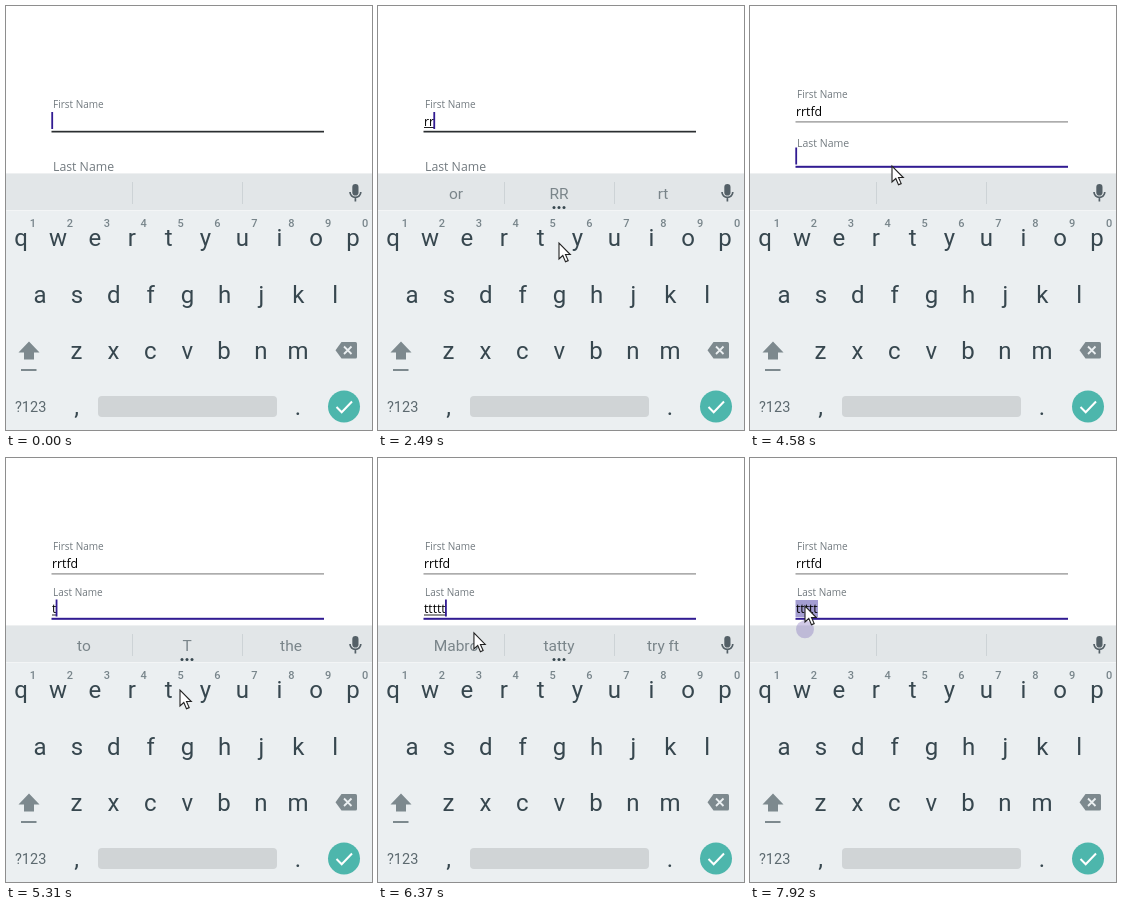
Animation, 366 px wide and 424 px high, one loop 7.99 s. Source, as an HTML page:

```html
<!DOCTYPE html>
<html lang="en">
<head>
<meta charset="utf-8">
<title>Form entry</title>
<style>
html, body { margin: 0; width: 100%; height: 100%; overflow: hidden; background: #fff; }
svg { display: block; width: 366px; height: 424px; }
text { font-family: Roboto, sans-serif; white-space: pre; }
.form text { font-family: "Open Sans", "Noto Sans", sans-serif; font-size: 12.3px; }
.form .label { fill: #737b80; font-size: 10px; }
.mid { text-anchor: middle; }
.key { font-size: 24px; fill: #37474f; }
.digit { font-size: 11px; font-weight: 500; fill: #78858b; }
.word { font-size: 15.5px; fill: #7a858a; }
</style>
</head>
<body>
<svg viewBox="0 0 366 424">
  <rect width="366" height="424" fill="#fff"/>
  <g id="form" class="form">
    <text class="label" x="47" y="101.5">First Name</text>
    <rect id="line1" x="45.5" width="272.5"/>
    <text id="label2" class="label" x="47">Last Name</text>
    <rect id="line2" x="45.5" width="272.5"/>
    <rect id="selection" x="45.5" y="151.5" width="22.5" height="17" fill="#a39dd1"/>
    <text id="value1" x="46" y="119.5"></text>
    <text id="value2" x="46" y="164.5"></text>
    <rect id="under" x="46" height="1" fill="#222"/>
    <rect id="caret" width="1.8" height="17" fill="#311b92"/>
  </g>
  <g id="board">
    <rect y="167" width="366" height="1" fill="#eef0f1"/>
    <rect y="168" width="366" height="256" fill="#ebeff1"/>
    <rect y="168" width="366" height="36" fill="#e2e6e8"/>
    <rect y="204" width="366" height="1" fill="#f3f5f6"/>
    <path d="M126.5 176V198M236.5 176V198" stroke="#cdd3d6"/>
    <g fill="#546067">
      <rect x="346.3" y="178" width="6.2" height="11.5" rx="3.1"/>
      <path d="M344 186a5.4 5.4 0 0 0 10.8 0M349.4 191.5V195.5" fill="none" stroke="#546067" stroke-width="1.7"/>
    </g>
    <path d="M23 335.5L33.5 346.5H28V353.5H18V346.5H12.500Z" fill="#7d898e"/>
    <rect x="15" y="363" width="15.500" height="2" fill="#7d898e"/>
    <path d="M335.500 336H349.500a1.500 1.500 0 0 1 1.500 1.500V351a1.500 1.500 0 0 1-1.500 1.500H335.500L329.500 344.300Z" fill="#7d898e"/>
    <path d="M338 340.500L345.500 348M345.500 340.500L338 348" stroke="#ebeff1" stroke-width="1.8"/>
    <text x="9" y="406" font-size="14.5" fill="#5c696f">?123</text>
    <rect x="92" y="390" width="179" height="21" rx="4" fill="#d0d4d6"/>
    <circle cx="338" cy="400.500" r="16" fill="#4db6ac"/>
    <path d="M330.500 401L335.700 406.200L346 395.500" fill="none" stroke="#fff" stroke-width="2"/>
  </g>
  <g id="words"></g>
  <g id="dots" fill="#37474f">
    <circle cx="176" cy="201.500" r="1.5"/><circle cx="181" cy="201.500" r="1.5"/><circle cx="186" cy="201.500" r="1.5"/>
  </g>
  <g id="popup">
    <rect x="-21" y="-91" width="45" height="103" rx="2" fill="#000" opacity=".1"/>
    <rect x="-21.500" y="-92" width="44.500" height="102.500" rx="2" fill="#000" opacity=".22"/>
    <rect x="-22" y="-93" width="44.500" height="102.500" rx="2" fill="#ced2d4"/>
    <text id="popupKey" class="mid" y="-54" font-size="34" fill="#37474f"></text>
    <path d="M9 -45H21" stroke="#7d898e" stroke-width="1.5" stroke-dasharray="1.5 2"/>
  </g>
  <path id="handle" d="M55 161.500L61.500 165A9 9 0 1 1 48.500 165Z" fill="#7a68b8"/>
  <circle id="tap" r="12" fill="#e9e53f" opacity=".8"/>
  <path id="mouse" d="M0 0V16L3.800 12.500L6.500 18.800L9.200 17.600L6.500 11.500H11.300Z" fill="#fff" stroke="#222" stroke-width="1.1"/>
</svg>
<script>
const LOOP = 7990;
const $ = id => document.getElementById(id);
const set = (el, attrs) => { for (const k in attrs) el.setAttribute(k, attrs[k]); };
const show = (el, on) => el.setAttribute('visibility', on ? 'visible' : 'hidden');
const clamp = v => Math.max(0, Math.min(1, v));
const progress = (t, from, to) => clamp((t - from) / (to - from));
const mix = (a, b, p) => a + (b - a) * p;

function addText(parent, cls, x, y, content = '') {
  const el = document.createElementNS('http://www.w3.org/2000/svg', 'text');
  set(el, { class: cls + ' mid', x, y });
  el.textContent = content;
  return $(parent).appendChild(el);
}

// Keyboard rows: letters, first key centre, baseline
const keys = {};
for (const [letters, x0, base] of [
  ['qwertyuiop', 15, 240], ['asdfghjkl', 34, 296.5], ['zxcvbnm', 70.5, 353]
]) [...letters].forEach((c, i) => {
  keys[c] = { x: x0 + i * 36.9, base };
  addText('board', 'key', keys[c].x, base, c);
});
[...'1234567890'].forEach((c, i) => addText('board', 'digit', 27 + i * 36.9, 220.500, c));
addText('board', 'key', 70.5, 409, ',');
addText('board', 'key', 292, 409, '.');
const words = [78, 181, 285].map(x => addText('words', 'word', x, 193));

// Key presses: letter, down, up
const presses = [
  ['r', 1090, 1540], ['r', 1900, 2060], ['t', 2620, 2760], ['f', 2900, 2980], ['d', 3080, 3220],
  ['t', 5170, 5310], ['t', 5380, 5530], ['t', 5670, 5810], ['t', 5880, 6090], ['t', 6160, 6230]
];
const FOCUS = 4240, SELECT = 7720, PLACE = 7190;
const taps = [[4030, 4170], [7050, PLACE], [7500, 7590]];

const suggestions = {
  r: ['or', 'R', 'rt'], rr: ['or', 'RR', 'rt'], rrt: ['art', 'try', 'rt'],
  rrtf: ['try', 'RTF', 'art f'], rrtfd: ['try fr', 'try cf', 'riff'],
  t: ['to', 'T', 'the'], tt: ['ft', 'TT', 'to'], ttt: ['ft', 'TTT', 'to'],
  tttt: ['tatty', 'TTTT', 'try'], ttttt: ['Mabro', 'tatty', 'try ft']
};

// Pointer path: time, x, y
const path = [
  [70, 235, 423], [390, 133, 248], [740, 131, 248], [1010, 131, 248], [1090, 130, 252],
  [2060, 130, 252], [2290, 181, 237], [2760, 181, 237], [2880, 149, 293], [2980, 149, 293],
  [3080, 112, 293], [3220, 112, 295], [3360, 142, 157], [3830, 142, 157], [4030, 142, 160],
  [4910, 142, 160], [5150, 174, 232], [6230, 174, 232], [6370, 96, 175], [6780, 69, 152],
  [6910, 69, 152], [7050, 55, 148]
];

function pointerAt(t) {
  const i = path.findIndex(p => p[0] > t);
  if (i < 0) return path.at(-1).slice(1);
  if (i === 0) return path[0].slice(1);
  const [a, b] = [path[i - 1], path[i]];
  const p = progress(t, a[0], b[0]);
  return [mix(a[1], b[1], p), mix(a[2], b[2], p)];
}

function render(t) {
  const typed = presses.filter(p => p[2] <= t);
  const focused = t >= FOCUS, selected = t >= SELECT;
  const first = typed.filter(p => p[2] < FOCUS).map(p => p[0]).join('');
  const second = typed.filter(p => p[2] > FOCUS).map(p => p[0]).join('');
  const current = focused ? second : first;
  $('value1').textContent = first;
  $('value2').textContent = second;

  const scroll = progress(t, FOCUS, 4400);
  const rise = 1 - (1 - progress(t, 4400, 4740)) ** 2;
  set($('form'), { transform: `translate(0 ${-9.5 * scroll})` });
  set($('line1'), { y: 124.8, height: focused ? 1.2 : 1.7, fill: focused ? '#8b8b8b' : '#2b2e31' });
  set($('line2'), { y: 169.300, height: focused ? 2 : 1.2, fill: focused ? '#311b92' : '#8b8b8b' });
  set($('label2'), { y: mix(165, 147, rise) });
  $('label2').style.fontSize = mix(12.3, 10, rise) + 'px';

  const width = current ? $(focused ? 'value2' : 'value1').getComputedTextLength() : 0;
  const top = focused ? 151 : 106;
  set($('under'), { y: top + 15, width });
  show($('under'), current && !selected);
  show($('selection'), selected);

  const placed = t >= PLACE;
  const resets = [-400, FOCUS, PLACE, ...typed.map(p => p[2])].filter(r => r <= t);
  const idle = t - Math.max(...resets);
  set($('caret'), { x: 45.3 + (placed ? width * .4 : width), y: top });
  show($('caret'), !selected && Math.floor(idle / 500) % 2 === 0);

  const list = selected ? null : suggestions[current];
  words.forEach((w, i) => { w.textContent = list ? list[i] : ''; });
  show($('dots'), list);

  const press = presses.find(p => t >= p[1] && t < p[2]);
  show($('popup'), press);
  if (press) {
    const key = keys[press[0]];
    set($('popup'), { transform: `translate(${key.x} ${key.base})` });
    $('popupKey').textContent = press[0];
  }

  const [x, y] = pointerAt(t);
  set($('mouse'), { transform: `translate(${x} ${y})` });
  show($('mouse'), t >= 70);
  set($('tap'), { cx: x - 1, cy: y });
  show($('tap'), press || taps.some(([a, b]) => t >= a && t < b));
  set($('handle'), { opacity: mix(.9, .35, progress(t, SELECT, 7900)) });
  show($('handle'), placed);
}

const start = performance.now();
function tick() {
  render((performance.now() - start) % LOOP);
  requestAnimationFrame(tick);
}
tick();
</script>
</body>
</html>
```
